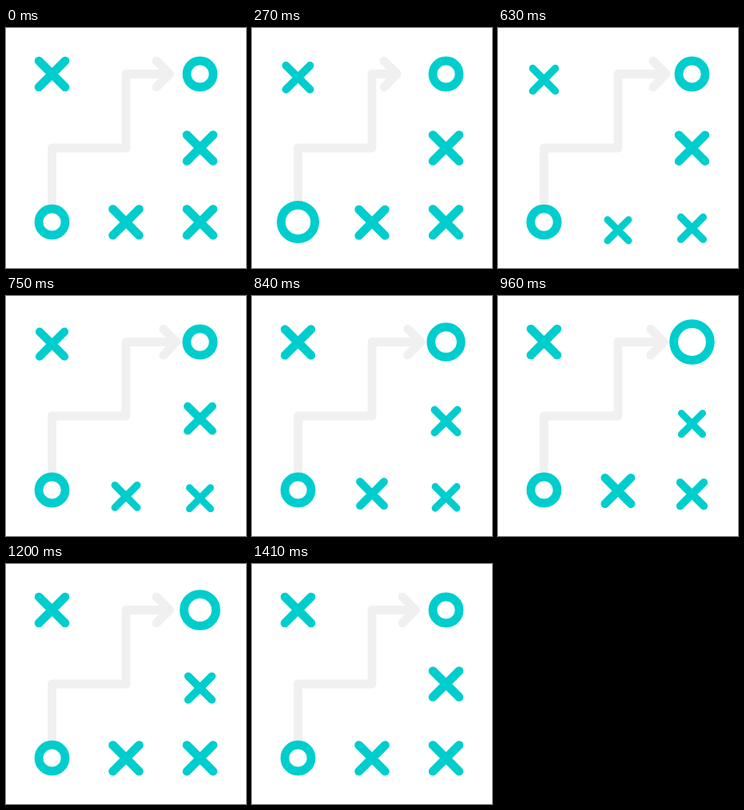
An HTML page that plays this animation: 300 by 300 pixels, repeating every 1500 ms.

```html
<!DOCTYPE html>
<html lang="en">
<head>
<meta charset="utf-8">
<title>Tactic board</title>
<style>
  html, body { margin: 0; height: 100%; overflow: hidden; background: #fff; }
  svg { display: block; width: 100vw; height: 100vh; }
  path, circle { fill: none; stroke-width: 10.8; stroke-linecap: round; stroke-linejoin: round; }
  .teal { stroke: #00cdcd; }
  .grey { stroke: #f0f0f0; stroke-linecap: butt; }
  #head { stroke-linecap: round; }
</style>
</head>
<body>
<svg viewBox="0 0 300 300">
  <path id="shaft" class="grey"/>
  <path id="head" class="grey" d="M-16.4 -16.4L0 0L-16.4 16.4"/>
</svg>
<script>
const LOOP = 1500, STEP = 30;
const svg = document.querySelector('svg');
const shaft = document.getElementById('shaft');
const head = document.getElementById('head');

function add(tag, attrs) {
  const el = document.createElementNS('http://www.w3.org/2000/svg', tag);
  el.setAttribute('class', 'teal');
  for (const key in attrs) el.setAttribute(key, attrs[key]);
  return svg.appendChild(el);
}

// Eased 0 → 1 between two times.
function ease(t, from, to) {
  const p = Math.min(1, Math.max(0, (t - from) / (to - from)));
  return p * p * (3 - 2 * p);
}

// Eased 0 → 1 → 0 around a peak time.
const pulse = (t, peak, half) => ease(Math.abs(t - peak), half, 0);

const crosses = [
  { x: 57.5, y: 57.5, peak: 487 },
  { x: 150, y: 242.8, peak: 625 },
  { x: 242.5, y: 242.8, peak: 760 },
  { x: 242.5, y: 150, peak: 1000 }
].map(c => ({ ...c, el: add('path', { d: 'M-16.4 -16.4L16.4 16.4M16.4 -16.4L-16.4 16.4' }) }));

const rings = [
  { cx: 57.5, cy: 242.5, peak: 350, grow: 5.5 },
  { cx: 242.5, cy: 57.5, peak: 1037, grow: 7.5 }
].map(r => ({ ...r, el: add('circle', { cx: r.cx, cy: r.cy }) }));

function draw(t) {
  for (const { el, x, y, peak } of crosses) {
    const k = pulse(t, peak, 400);
    el.setAttribute('transform', `translate(${x} ${y + 10 * k}) scale(${1 - 0.2 * k})`);
  }
  for (const { el, peak, grow } of rings) {
    el.setAttribute('r', 16.5 + grow * pulse(t, peak, 310));
  }
  // The arrow pulls back, shoots past its rest point and settles.
  const tip = 204.5 - 26 * ease(t, 40, 330) + 35 * ease(t, 330, 700) - 9 * ease(t, 700, 1110);
  shaft.setAttribute('d', `M57.5 222V150H150V57.5H${tip}`);
  head.setAttribute('transform', `translate(${tip} 57.5)`);
}

function frame() {
  const t = performance.now() % LOOP;
  draw(Math.floor(t / STEP) * STEP);
  requestAnimationFrame(frame);
}
frame();
</script>
</body>
</html>
```
